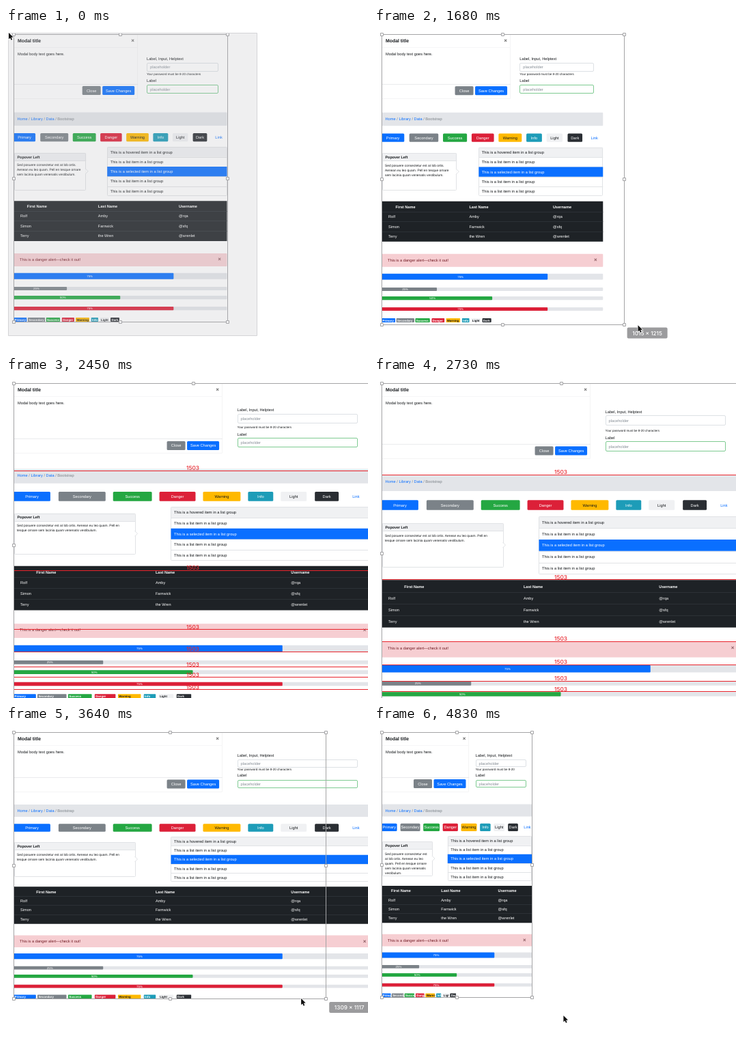
Write an HTML page with a canvas that moves like this. It is 530 by 470 pixels and loops after 4.9 s.

```html
<!DOCTYPE html>
<html lang="en">
<head>
<meta charset="utf-8">
<title>Resizing a component sheet</title>
<style>
html, body { margin: 0; width: 530px; height: 470px; overflow: hidden; background: #fff; }
canvas { display: block; width: 530px; height: 470px; }
</style>
</head>
<body>
<canvas id="stage" width="530" height="470"></canvas>
<script>
const ctx = document.getElementById('stage').getContext('2d');
const LOOP = 4900, STEP = 70;
const X0 = 11, Y0 = 9;
const UNITS = 1503 / 525; // design units per pixel
const SANS = '"Liberation Sans", Arial, sans-serif';
const LABEL = 'Inter, "Liberation Sans", sans-serif';
const INK = '#15181b', LINE = '#e1e3e6', TRACK = '#e3e5e9';
const BLUE = '#0a6fff', GRAY = '#7b8288', GREEN = '#24a742', RED = '#dc2038',
      GOLD = '#ffb900', TEAL = '#1d9cb8', PALE = '#f0f1f3', DARK = '#2a2e33';

// name, fill, text colour, button span, badge span (fractions of the width)
const THEMES = [
  ['Primary', BLUE, '#fff', 0, .1027, 0, .0627],
  ['Secondary', GRAY, '#fff', .1255, .2567, .0665, .148],
  ['Success', GREEN, '#fff', .2776, .3859, .152, .2186],
  ['Danger', RED, '#fff', .4068, .5076, .226, .285],
  ['Warning', GOLD, INK, .5285, .6331, .291, .3555],
  ['Info', TEAL, '#fff', .654, .7243, .363, .397],
  ['Light', PALE, INK, .7452, .8175, .405, .4468],
  ['Dark', DARK, '#fff', .8403, .9068, .4544, .496]
];
const TABLE = [
  ['First Name', 'Last Name', 'Username'],
  ['Rolf', 'Amby', '@rqa'],
  ['Simon', 'Farnwick', '@sfq'],
  ['Terry', 'the Wren', '@wrenlet']
];
// top, bottom, filled share, label, label position, colour
const BARS = [
  [.831, .852, .75, '75%', .343, BLUE],
  [.879, .891, .25, '25%', .093, GRAY],
  [.91, .9225, .5, '50%', .217, GREEN],
  [.948, .96, .75, '75%', .343, RED]
];
const GUIDES = [.272, .58, .7625, .831, .879, .91, .948];
const POPOVER = 'Sed posuere consectetur est at lob ortis. Aenean eu leo quam. ' +
  'Pell en tesque ornare sem lacinia quam venenatis vestibulum.';

// time, value
const WIDTH = [[1540, 312.5], [2030, 525], [3570, 525], [3640, 457.2], [3710, 383],
  [3780, 335], [3850, 309], [3920, 290], [4550, 220.4]];
const HEIGHT = [[1540, 421], [2030, 439], [2170, 439], [2660, 497], [2730, 497], [2940, 490],
  [3010, 482], [3080, 464], [3150, 427], [3220, 401], [3290, 390], [3640, 390], [4550, 388]];
const CURSOR_X = [[70, 4], [490, 300], [560, 300], [700, 451], [910, 340], [1120, 324]];
const CURSOR_Y = [[70, 7], [490, 350], [560, 350], [700, 452], [910, 428], [1120, 430]];

function track(keys, t) {
  if (t <= keys[0][0]) return keys[0][1];
  for (let i = 1; i < keys.length; i++) {
    const [a, from] = keys[i - 1], [b, to] = keys[i];
    if (t <= b) {
      const u = (t - a) / (b - a);
      return from + (to - from) * u * u * (3 - 2 * u);
    }
  }
  return keys[keys.length - 1][1];
}

const boxAt = t => ({ w: track(WIDTH, t), h: track(HEIGHT, t) });

function fill(x1, y1, x2, y2, color, r = 0) {
  ctx.fillStyle = color;
  ctx.beginPath();
  ctx.roundRect(x1, y1, x2 - x1, y2 - y1, r);
  ctx.fill();
}

function frame(x1, y1, x2, y2, color, r = 0) {
  x1 = Math.round(x1) + .5; y1 = Math.round(y1) + .5;
  ctx.strokeStyle = color;
  ctx.lineWidth = 1;
  ctx.beginPath();
  ctx.roundRect(x1, y1, Math.round(x2) - .5 - x1, Math.round(y2) - .5 - y1, r);
  ctx.stroke();
}

const rule = (x1, x2, y, color) => fill(x1, Math.round(y), x2, Math.round(y) + 1, color);

// y is the middle of the capitals
function text(s, x, y, color = INK, size = 5.7, weight = 400, align = 'left', family = SANS) {
  ctx.font = `${weight} ${size}px ${family}`;
  ctx.textAlign = align;
  ctx.fillStyle = color;
  ctx.fillText(s, x, y + size * .36);
}

function wrap(s, size, limit) {
  ctx.font = `100px ${SANS}`;
  const lines = [];
  let line = '';
  for (const word of s.split(' ')) {
    const next = line ? line + ' ' + word : word;
    if (line && ctx.measureText(next).width * size / 100 > limit) {
      lines.push(line);
      line = word;
    } else line = next;
  }
  return lines.concat(line);
}

function modal(w, h) {
  const right = X0 + .583 * w, mid = Y0 + .2156 * h - 8.15;
  frame(X0, Y0, right, mid + 12, '#f4f4f5');
  rule(X0, right, 28, '#f6f6f7');
  rule(X0, right, mid - 10, '#eaebed');
  text('Modal title', 17, 19, INK, 6.9, 700);
  text('×', right - 7.5, 18.5, '#666', 8, 700, 'center');
  text('Modal body text goes here.', 17, 38);
  fill(right - 81.5, mid - 6.5, right - 54.5, mid + 6.5, GRAY, 1.5);
  fill(right - 52, mid - 6.5, right - 5, mid + 6.5, BLUE, 1.5);
  text('Close', right - 68, mid, '#fff', 5.7, 400, 'center');
  text('Save Changes', right - 28.5, mid, '#fff', 5.7, 400, 'center');
}

function form(w, h) {
  const x = X0 + .624 * w, right = X0 + .96 * w, half = .0152 * h;
  const first = Y0 + .0826 * h + 13.4, second = Y0 + .156 * h + 15;
  text('Label, Input, Helptext', x, Y0 + .078 * h + 3.2);
  frame(x, first - half, right, first + half, '#dde1e5', 1.5);
  text('placeholder', x + 5, first, '#868e96');
  text(wrap('Your password must be 8-20 characters', 4.5, right - x)[0],
    x, Y0 + .1376 * h + .6, INK, 4.5);
  text('Label', x, Y0 + .156 * h + 2.5);
  frame(x, second - half, right, second + half, '#7fcb92', 1.5);
  text('placeholder', x + 5, second, '#868e96');
}

function breadcrumb(w, h) {
  const top = Y0 + .272 * h;
  fill(X0, top, X0 + w, Y0 + .318 * h, TRACK, 1);
  let x = 16.5;
  for (const [s, color] of [['Home', BLUE], [' / ', GRAY], ['Library', BLUE], [' / ', GRAY],
    ['Data', BLUE], [' / Bootstrap', GRAY]]) {
    text(s, x, top + 9, color);
    x += ctx.measureText(s).width;
  }
}

function buttons(w, h) {
  const top = Y0 + .3445 * h, bottom = Y0 + .3738 * h, mid = (top + bottom) / 2;
  for (const [name, bg, ink, a, b] of THEMES) {
    fill(X0 + a * w, top, X0 + b * w, bottom, bg, 1.5);
    text(name, X0 + (a + b) / 2 * w, mid, ink, 5.7, 400, 'center');
  }
  text('Link', X0 + .945 * w, mid, BLUE);
}

function popover(w, h) {
  const top = Y0 + .4125 * h, bottom = Y0 + .543 * h, right = X0 + .34 * w, tip = Y0 + .477 * h;
  fill(12, top, right, top + 12, PALE, 1);
  frame(12, top, right, bottom, LINE, 1);
  rule(12, right, top + 11, LINE);
  ctx.fillStyle = '#fff';
  ctx.strokeStyle = LINE;
  ctx.beginPath();
  ctx.moveTo(right - 1, tip - 4);
  ctx.lineTo(right + 3, tip);
  ctx.lineTo(right - 1, tip + 4);
  ctx.fill();
  ctx.stroke();
  text('Popover Left', 16.5, top + 6, INK, 5.4, 700);
  wrap(POPOVER, 4.85, .3345 * w - 10.1)
    .forEach((s, i) => text(s, 16, top + 18 + i * 7, INK, 4.85));
}

function list(w, h) {
  const x = X0 + .439 * w, right = X0 + w, y = i => Y0 + (.393 + .0339 * i) * h;
  fill(x, y(0), right, y(1), PALE);
  frame(x, y(0), right, y(5), LINE, 1);
  for (let i = 1; i < 5; i++) rule(x, right, y(i), LINE);
  fill(x, y(2), right, y(3), BLUE);
  ['hovered', 'list', 'selected', 'list', 'list'].forEach((kind, i) =>
    text(`This is a ${kind} item in a list group`, x + 4.5, y(i + .5), i === 2 ? '#fff' : INK));
}

function table(w, h) {
  fill(X0, Y0 + .58 * h, X0 + w, Y0 + .72 * h, '#1e2226');
  TABLE.forEach((row, i) => {
    const y = Y0 + (.5987 + .0342 * i) * h;
    if (i) rule(X0, X0 + w, y - .0175 * h, '#2c3136');
    [i ? 21 : X0 + .0635 * w, X0 + .396 * w, X0 + .774 * w].forEach((x, c) =>
      text(row[c], x, y, '#fff', 5.6, i ? 400 : 700));
  });
}

function alertBox(w, h) {
  const top = Y0 + .7625 * h;
  fill(X0, top, X0 + w, Y0 + .8077 * h, '#f6ced2', 1);
  text('This is a danger alert—check it out!', 20, top + 8.7, '#721c24');
  text('×', X0 + w - 11, top + 8.5, '#8b5a60', 8, 700, 'center');
}

function bars(w, h) {
  for (const [a, b, part, label, at, color] of BARS) {
    const top = Y0 + a * h, bottom = Y0 + b * h;
    fill(X0, top, X0 + w, bottom, TRACK, 1);
    fill(X0, top, X0 + part * w, bottom, color, 1);
    text(label, X0 + at * w, (top + bottom) / 2, '#fff', 4.4);
  }
}

function badges(w, h) {
  const top = Y0 + .9858 * h, bottom = Y0 + h;
  for (const [name, bg, ink, , , a, b] of THEMES) {
    const left = X0 + a * w, right = X0 + b * w;
    ctx.save();
    ctx.beginPath();
    ctx.rect(left, top - 1, right - left, bottom - top + 2);
    ctx.clip();
    fill(left, top, right, bottom, bg, 1);
    text(name, left + 1.5, (top + bottom) / 2, ink, 4.4, 700);
    ctx.restore();
  }
}

function guides({ w, h }) {
  for (const g of GUIDES) {
    const y = Y0 + g * h;
    rule(X0, X0 + w, y - 1.3, '#e8242c');
    text('1503', X0 + w / 2, y - 4.7, '#e8242c', 8.2, 500, 'center', LABEL);
  }
}

function selection({ w, h }) {
  frame(X0, Y0, X0 + w + 1, Y0 + h + 1, '#a4a4a6');
  for (const i of [0, .5, 1]) for (const j of [0, .5, 1]) {
    if (i === .5 && j === .5) continue;
    const x = Math.round(X0 + i * w), y = Math.round(Y0 + j * h);
    fill(x - 2, y - 2, x + 3, y + 3, '#fff');
    frame(x - 2, y - 2, x + 3, y + 3, '#a4a4a6');
  }
}

function sizeTag({ w, h }) {
  const x = X0 + w + 5, y = Y0 + h + 5;
  fill(x, y, x + 59, y + 16, '#9b9b9d', 2);
  text(`${Math.round(w * UNITS)} × ${Math.round(h * UNITS)}`,
    x + 29.5, y + 8, '#fff', 8.2, 500, 'center', LABEL);
}

function cursor(x, y) {
  ctx.save();
  ctx.translate(x, y);
  ctx.beginPath();
  [[0, 0], [0, 9.3], [2.1, 7.4], [3.6, 10.8], [5.2, 10.1], [3.8, 6.8], [6.6, 6.6]]
    .forEach(p => ctx.lineTo(...p));
  ctx.closePath();
  ctx.strokeStyle = '#fff';
  ctx.lineWidth = 1.4;
  ctx.stroke();
  ctx.fillStyle = '#111';
  ctx.fill();
  ctx.restore();
}

function cursorAt(t) {
  if (t < 1540) return [track(CURSOR_X, t), track(CURSOR_Y, t)];
  const { w, h } = boxAt(t + STEP / 2);
  const away = track([[4690, 0], [4830, 1]], t);
  return [X0 + w + 1 + 45 * away, Y0 + h + 27 * away];
}

function draw(t) {
  const box = boxAt(t), { w, h } = boxAt(t - STEP); // contents trail the box
  ctx.textRendering = 'geometricPrecision';
  fill(0, 0, 530, 470, '#fff');
  for (const part of [modal, form, breadcrumb, buttons, popover, list, table, alertBox, bars, badges])
    part(w, h);
  if (t >= 2030 && t < 3290) guides(box);
  selection(box);
  if (t >= 1610 && t < 4620) sizeTag(box);
  const fade = 1 - t / 490;
  if (fade > 0) {
    ctx.globalAlpha = fade;
    fill(3, 7, 368, 451, 'rgba(178,178,184,.21)');
    frame(3, 7, 368, 451, '#d4d4d7');
    ctx.globalAlpha = 1;
  }
  cursor(...cursorAt(t));
}

const start = performance.now();
function tick() {
  const t = (performance.now() - start) % LOOP;
  draw(Math.floor(t / STEP) * STEP);
  requestAnimationFrame(tick);
}
tick();
</script>
</body>
</html>
```
